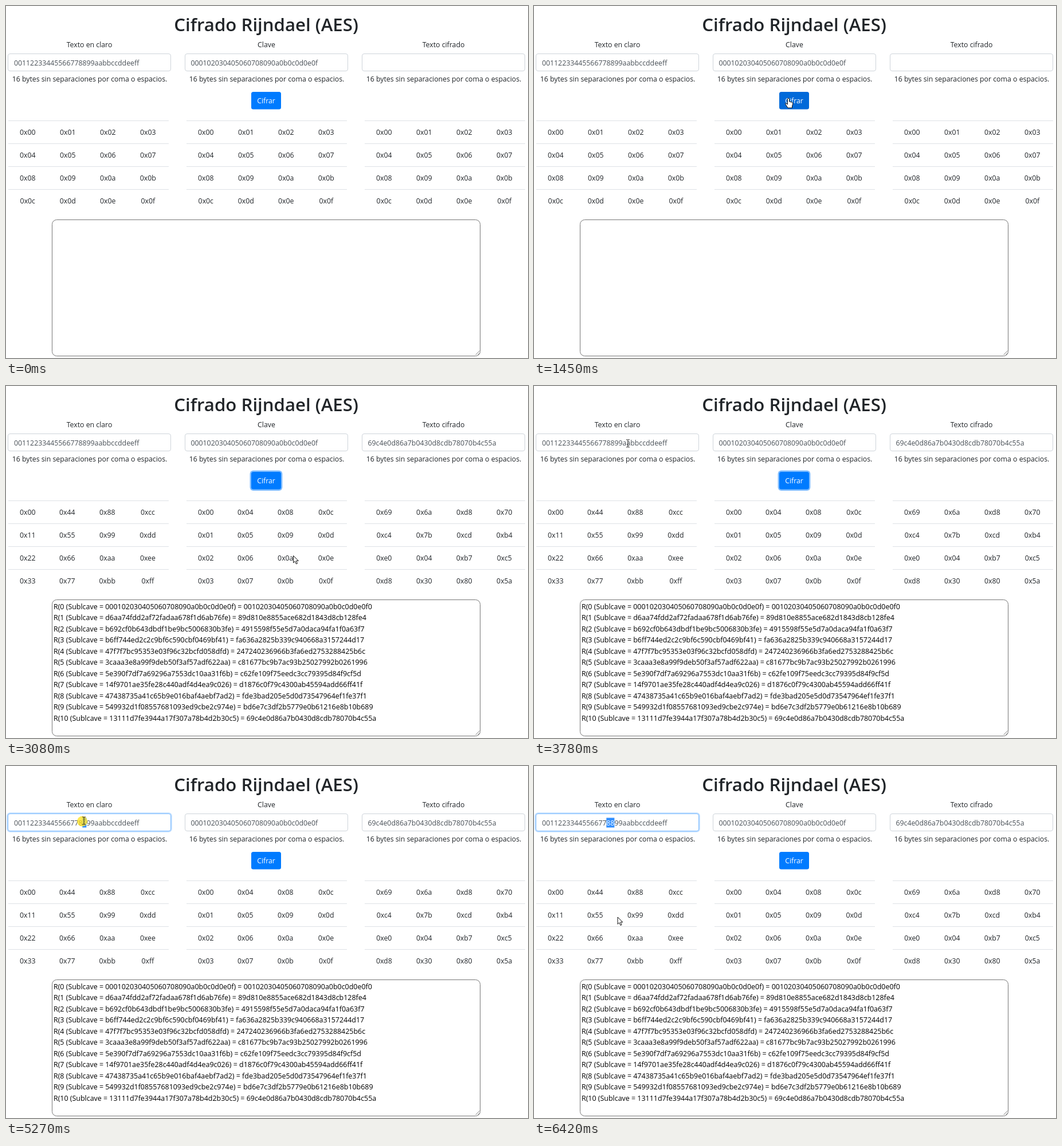
An HTML page that plays this animation: 911x615 px, repeating every 8 s.

```html
<!DOCTYPE html>
<html lang="es">
<head>
<meta charset="utf-8">
<title>Cifrado Rijndael (AES)</title>
<style>
  html, body { margin: 0; width: 100%; height: 100%; overflow: hidden; background: #fff; }
  svg { display: block; width: 911px; height: 615px; }
  text { font: 12.3px "Open Sans", "Noto Sans", sans-serif; fill: #212529; white-space: pre; }
  .mid { text-anchor: middle; }
  .title { font-size: 31.2px; font-weight: 600; }
  .field { fill: #495057; }
  .log { font-size: 12.44px; fill: #000; }
  .light { fill: #fff; }
</style>
</head>
<body>
<svg id="stage" viewBox="0 0 911 615"></svg>
<script>
const LOOP = 8000, STEP = 77;
const PLAIN = "00112233445566778899aabbccddeeff";
const KEY = "000102030405060708090a0b0c0d0e0f";
const CIPHER = "69c4e0d86a7b0430d8cdb78070b4c55a";
const ROUNDS = `000102030405060708090a0b0c0d0e0f 00102030405060708090a0b0c0d0e0f0
d6aa74fdd2af72fadaa678f1d6ab76fe 89d810e8855ace682d1843d8cb128fe4
b692cf0b643dbdf1be9bc5006830b3fe 4915598f55e5d7a0daca94fa1f0a63f7
b6ff744ed2c2c9bf6c590cbf0469bf41 fa636a2825b339c940668a3157244d17
47f7f7bc95353e03f96c32bcfd058dfd 247240236966b3fa6ed2753288425b6c
3caaa3e8a99f9deb50f3af57adf622aa c81677bc9b7ac93b25027992b0261996
5e390f7df7a69296a7553dc10aa31f6b c62fe109f75eedc3cc79395d84f9cf5d
14f9701ae35fe28c440adf4d4ea9c026 d1876c0f79c4300ab45594add66ff41f
47438735a41c65b9e016baf4aebf7ad2 fde3bad205e5d0d73547964ef1fe37f1
549932d1f08557681093ed9cbe2c974e bd6e7c3df2b5779e0b61216e8b10b689
13111d7fe3944a17f307a78b4d2b30c5 69c4e0d86a7b0430d8cdb78070b4c55a`;

const stage = document.getElementById("stage");

function add(tag, attrs, parent = stage) {
  const el = document.createElementNS("http://www.w3.org/2000/svg", tag);
  for (const k in attrs) el.setAttribute(k, attrs[k]);
  parent.append(el);
  return el;
}
function label(x, y, str, cls = "mid", parent = stage) {
  const el = add("text", { x, y, class: cls }, parent);
  el.textContent = str;
  return el;
}
function box(x, y, width, height, rx, fill, stroke = "none") {
  return add("rect", { x, y, width, height, rx, fill, stroke });
}
const set = (el, attrs) => { for (const k in attrs) el.setAttribute(k, attrs[k]); };
const show = (el, on) => el.setAttribute("visibility", on ? "visible" : "hidden");

// Heading and the three fields
label(454, 43.7, "Cifrado Rijndael (AES)", "mid title");
const inputRing = box(1.2, 81.2, 288.6, 34.6, 6, "#bfdeff");
const inputs = ["Texto en claro", "Clave", "Texto cifrado"].map((name, i) => {
  const x = 3.5 + 309 * i;
  label(x + 142, 71.5, name);
  const frame = box(x, 83.5, 284, 30, 3.5, "#fff", "#ced4da");
  label(x + 142.5, 132, "16 bytes sin separaciones por coma o espacios.");
  return frame;
});
const plainX = 14, digitW = 7.02;
label(plainX, 104, PLAIN, "field");
label(322.5, 104, KEY, "field");
const cipherText = label(631.5, 104, CIPHER, "field");
const selBox = box(0, 90.5, 0, 17, 0, "#3390ff");
const selText = label(0, 104, "", "light");

// Button
const buttonRing = box(425.6, 147.4, 56.8, 35.6, 6, "#80bdff");
const button = box(428, 150, 52, 30.5, 3.5, "#007bff");
label(454, 170, "Cifrar", "mid light");

// Log frame with its resize grip
box(80.5, 373.5, 747, 238, 8, "#fff", "#767676");
add("path", { d: "M819.5 609.5l7-7M823.5 609.5l3-3", stroke: "#777", "stroke-width": 0.9 });

// Byte tables and log lines, before and after the click
const before = add("g", {}), after = add("g", {});
[PLAIN, KEY, CIPHER].forEach((hex, n) => {
  const left = 4 + 311 * n;
  const shifted = n < 2 ? [0, 69, 139, 209.6] : [0, 70, 140, 210];
  for (let r = 0; r < 4; r++) {
    add("path", { d: `M${left} ${200.5 + 40 * r}h280`, stroke: "#dee2e6" });
    for (let c = 0; c < 4; c++) {
      const x = left + 33.8, y = 225.3 + 40 * r, at = 2 * (4 * c + r);
      label(x + 70 * c, y, "0x0" + (4 * r + c).toString(16), "mid", before);
      label(x + shifted[c], y, "0x" + hex.slice(at, at + 2), "mid", after);
    }
  }
});
ROUNDS.split("\n").forEach((line, i) => {
  const [sub, out] = line.split(" ");
  label(83, 389.5 + 19.55 * i, `R(${i} (Sublcave = ${sub}) = ${out}`, "log", after);
});

// Pointer
const glow = add("circle", { r: 9, fill: "#ffe21a", opacity: 0.75 });
const ink = { fill: "#fff", stroke: "#111", "stroke-width": 1, "stroke-linejoin": "round" };
const pointers = {
  arrow: add("path", { d: "M0 0V12.3L2.9 9.7 4.9 14.4 7 13.5 5 8.9H8.8Z", ...ink }),
  hand: add("path", { d: "M-1.6 1.2Q0-1 1.6 1.2V6L6.3 7.2Q8 7.6 7.8 10L6.5 14V17H-1L-5 10.8Q-6 8.6-4 8.8L-1.6 11Z", ...ink }),
  beam: add("path", { d: "M-3-6.5H-1L0-6 1-6.5H3M0-6V6M-3 6.5H-1L0 6 1 6.5H3", fill: "none", stroke: "#222" })
};

const clamp = v => Math.max(0, Math.min(1, v));
const ease = p => p * p * (3 - 2 * p);
const steps = (t, start, n) => clamp(Math.floor((t - start) / STEP + 0.1) / n);
const quad = (a, b, c, p) => a.map((v, i) =>
  (1 - p) ** 2 * v + 2 * p * (1 - p) * b[i] + p * p * c[i]);
const line = (a, b, p) => a.map((v, i) => v + (b[i] - v) * p);

function pointerAt(t) {
  if (t < 1920) return quad([600, 596], [470, 290], [444, 161], ease(steps(t, 680, 10)));
  if (t < 2690) return line([445, 160], [505, 303], ease(steps(t, 2160, 5)));
  if (t < 3080) return [503, 300];
  if (t < 3930) return quad([501.5, 296.5], [400, 120], [150, 99], ease(steps(t, 3080, 10)));
  if (t < 4950) return line([150, 99], [141, 97], steps(t + STEP, 3930, 3));
  if (t < 5650) return line([141, 97], [127, 93], ease(steps(t, 5104, 5)));
  return quad([127, 93], [140, 170], [146, 264], ease(steps(t, 5650, 10)));
}

function mix(a, b, p) {
  return `rgb(${line(a, b, p).map(Math.round)})`;
}

function draw(t) {
  const [x, y] = pointerAt(t);
  const overButton = x > 428 && x < 480 && y > 150 && y < 181;
  const overText = x < 288 && y > 83 && y < 136;
  const kind = overButton ? "hand" : overText ? "beam" : "arrow";
  for (const k in pointers) {
    show(pointers[k], t >= 680 && k === kind);
    set(pointers[k], { transform: `translate(${x} ${y})` });
  }

  const pressed = (t >= 1920 && t < 2080) || (t >= 5030 && t < 5720);
  show(glow, pressed);
  set(glow, { cx: x - 3, cy: y + 1 });

  const done = t >= 2080;
  show(before, !done);
  show(after, done);
  show(cipherText, done);

  const hover = clamp((t - 1290) / 150) * (1 - clamp((t - 2310) / 150));
  set(button, { fill: mix([0, 123, 255], [0, 105, 217], hover) });
  set(buttonRing, { opacity: clamp((t - 1920) / 150) * (1 - clamp((t - 5030) / 150)) });

  const focus = clamp((t - 5030) / 150);
  set(inputRing, { opacity: focus });
  set(inputs[0], { stroke: mix([206, 212, 218], [128, 189, 255], focus) });

  const start = t < 5104 ? 18 : t >= 5650 ? 16 : Math.round((x - plainX) / digitW);
  const sx = plainX + digitW * start;
  set(selBox, { x: sx, width: Math.max(0, 18 - start) * digitW });
  set(selText, { x: sx });
  selText.textContent = PLAIN.slice(start, 18);
}

const origin = performance.now();
function tick() {
  draw((performance.now() - origin) % LOOP);
  requestAnimationFrame(tick);
}
tick();
</script>
</body>
</html>
```
